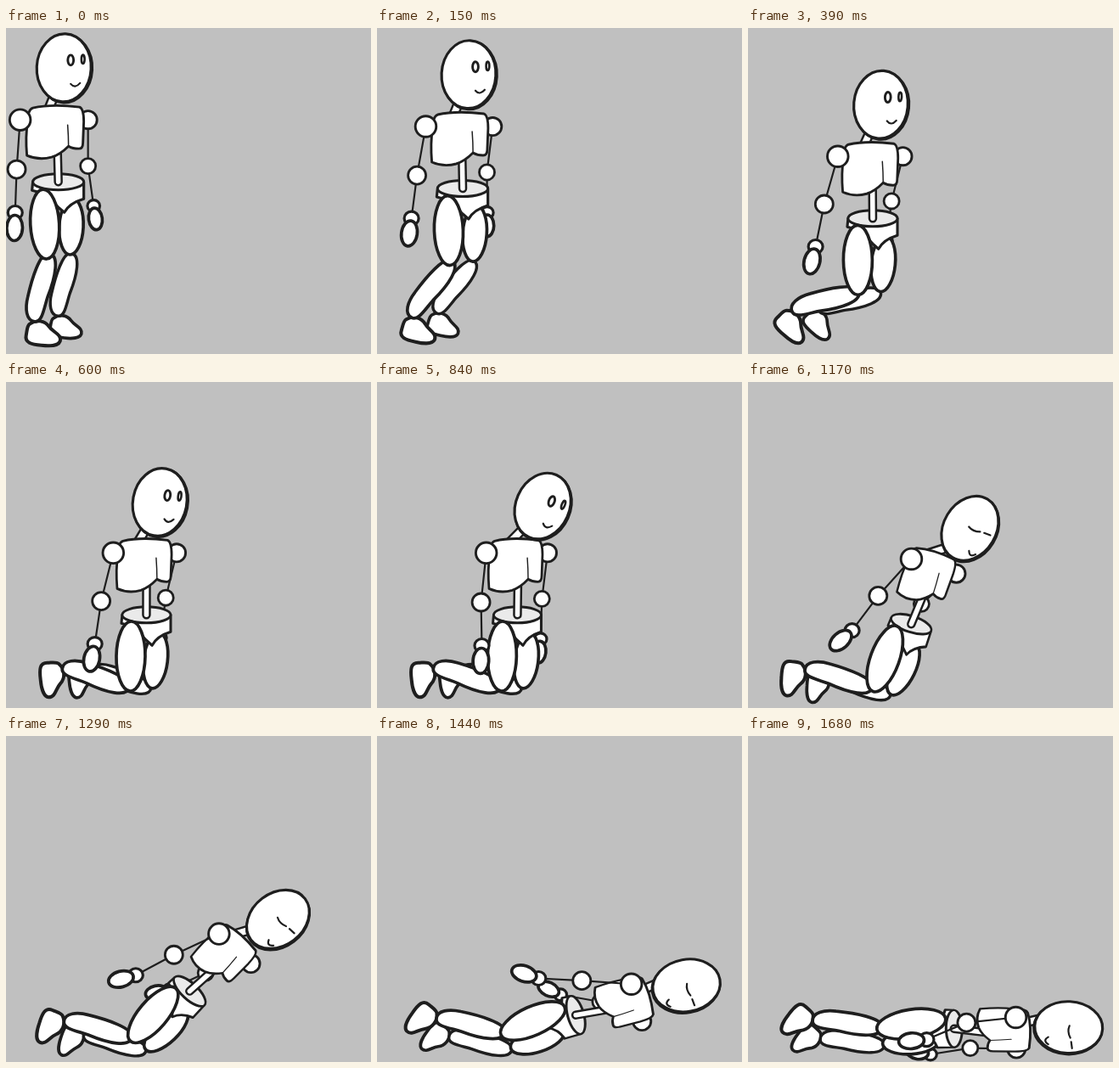
Write an HTML page with a canvas that moves like this. It is 430 by 384 pixels and loops after 1800 ms.

```html
<!DOCTYPE html>
<html lang="en">
<head>
<meta charset="utf-8">
<title>Falling puppet</title>
<style>
html, body { margin: 0; width: 430px; height: 384px; overflow: hidden; background: #c0c0c0; }
canvas { display: block; }
</style>
</head>
<body>
<canvas id="stage" width="430" height="384"></canvas>
<script>
const ctx = document.getElementById('stage').getContext('2d');
const INK = '#1e1e1e', LOOP = 1800, STEP = 30, END = 1680;

// Joint angles in degrees; the near knee is the root, twist turns the chest away.
const STAND = { x: 48, y: 265, thigh: -3, shin: 10, foot: 0, lean: 0, neck: 0, head: 0, twist: 0,
  arm: 4, fore: 2, farArm: 0, farFore: -8 };
const KNEEL = { x: 146, y: 357, thigh: 1, shin: 104, foot: 78, lean: 0, neck: 17, head: 21, twist: .25,
  arm: 6, fore: -1, farArm: 7, farFore: 2 };
const TIP = { x: 147, y: 357, thigh: 20, shin: 103, foot: 88, lean: 18, neck: 16, head: 28, twist: .65,
  arm: 42, fore: 37, farArm: 49, farFore: 37 };
const FALL = { x: 151, y: 346, thigh: 66, shin: 99, foot: 120, lean: 74, neck: -7, head: 77, twist: .85,
  arm: 94, fore: 93, farArm: 115, farFore: 100 };
const REST = { x: 158, y: 340, thigh: 81, shin: 93, foot: 122, lean: 89, neck: -9, head: 90, twist: 1,
  arm: 84, fore: 67, farArm: 91, farFore: 81 };
const ARM_KEYS = ['arm', 'fore', 'farArm', 'farFore'];

const rad = a => a * Math.PI / 180;
const ramp = (t, a, b) => Math.min(1, Math.max(0, (t - a) / (b - a)));

function blend(a, b, p, own = {}) {
  const out = {};
  for (const k in a) out[k] = a[k] + (b[k] - a[k]) * (own[k] ?? p);
  return out;
}

function sink(t) {
  const u = ramp(t, 0, 600), s = ramp(t, 0, 840), late = s ** 3;
  const p = blend(STAND, KNEEL, s, {
    x: 1 - (1 - u) ** 1.7, y: u ** 1.8, foot: u ** 1.8, shin: u, thigh: u, neck: late, head: late
  });
  for (const k of ARM_KEYS) p[k] += 11 * Math.sin(Math.PI * s);
  return p;
}

function pose(t) {
  if (t < 1035) return sink(t);
  if (t < 1170) return blend(KNEEL, TIP, ramp(t, 1035, 1170) ** 1.5);
  if (t < 1440) return blend(TIP, FALL, ramp(t, 1170, 1440));
  const slow = ramp(t, 1440, END);
  return blend(FALL, REST, ramp(t, 1440, 1545), Object.fromEntries(ARM_KEYS.map(k => [k, slow])));
}

// Point reached from p by the offset (dx, dy) turned by a
function from([x, y], a, dx, dy) {
  const c = Math.cos(rad(a)), s = Math.sin(rad(a));
  return [x + dx * c - dy * s, y + dx * s + dy * c];
}

function oval(rx, ry, x = 0, y = 0, a = 0) {
  const p = new Path2D();
  p.ellipse(x, y, rx, ry, rad(a), 0, 7);
  return p;
}

const SKULL = oval(32, 40, 0, 0, 3);
const SHIN = new Path2D('M2-41C16-42 15-14 10 10C8 24 9 41 0 41C-10 42-14 28-13 14C-12-8-8-40 2-41Z');
const FOOT = new Path2D('M-16-11C-8-17 2-15 7-8C12-1 22 1 20 9C18 15 6 15-2 14C-14 13-22 11-20 2C-19-3-19-9-16-11Z');
const CHEST = new Path2D('M-27-28Q-5-33 28-29Q33-27 33-12L32 13Q32 20 27 20Q20 20 15 17Q5 27-5 30Q-20 34-34 28Q-36 5-33-12Q-33-26-27-28Z');
const CREASE = new Path2D('M14-8Q15 5 15 17');
const BRIEFS = new Path2D('M-30 0L-31 10L-16 14L0 30L7 36Q13 25 30 20L30 0Z');
const SHUT = new Path2D('M-2-1Q5 2 13-2M18-3L26-4M12 24Q16 31 21 24');
const SMILE = new Path2D('M8 19Q13 25 19 18');

function ink(path, width, fill) {
  if (fill) {
    ctx.fillStyle = fill;
    ctx.fill(path);
  }
  ctx.strokeStyle = INK;
  ctx.lineWidth = width;
  ctx.stroke(path);
}

function place([x, y], a, paint, sx = 1, sy = 1) {
  ctx.save();
  ctx.translate(x, y);
  ctx.rotate(rad(a));
  ctx.scale(sx, sy);
  paint();
  ctx.restore();
}

const part = (at, a, path, width = 3.7, size = 1) =>
  place(at, a, () => ink(path, width, '#fff'), size, size);

function line(a, b, width, color = INK) {
  ctx.strokeStyle = color;
  ctx.lineWidth = width;
  ctx.beginPath();
  ctx.moveTo(...a);
  ctx.lineTo(...b);
  ctx.stroke();
}

function tube(a, b, width) {
  line(a, b, width);
  line(a, b, width - 5, '#fff');
}

function arm(shoulder, upper, fore, wristBend, size, reach) {
  const elbow = from(shoulder, upper, 0, 58.5 * reach);
  const wrist = from(elbow, fore, 0, 51 * reach);
  line(shoulder, elbow, 2.2);
  line(elbow, wrist, 2.2);
  part(elbow, 0, oval(10.5 * size, 10.5 * size), 2.8);
  part(wrist, 0, oval(8.5 * size, 8 * size), 3.2);
  part(wrist, fore + wristBend, oval(9.3 * size, 15 * size, 0, 18 * size));
  part(shoulder, 0, oval(12.3 * size, 12.3 * size), 2.9);
}

function lowerLeg(knee, shin, foot, size) {
  const ankle = from(knee, shin, 0, 82 * size);
  part(from(ankle, foot, 10 * size, 14 * size), foot, FOOT, 4, size);
  part(from(knee, shin, 0, 41 * size), shin, SHIN, 3.7, size);
}

function face(shut) {
  if (shut) {
    ink(SHUT, 2.2);
    return;
  }
  ink(oval(3.4, 6, 8, -9), 2.9);
  ink(oval(1.9, 5.2, 22.5, -10), 2.6);
  ink(SMILE, 2.2);
}

function draw(t) {
  ctx.fillStyle = '#c0c0c0';
  ctx.fillRect(0, 0, 430, 384);
  ctx.lineCap = ctx.lineJoin = 'round';

  const p = pose(t), q = p.twist, wide = 1 - .27 * q;
  const knee = [p.x, p.y];
  const hip = from(knee, p.thigh, 18, -83);
  const chest = from(hip, p.lean, 6 * q - 3, -59);
  const head = from(chest, p.lean + p.neck, 10, -75);
  const farThigh = p.thigh + 6;

  arm(from(chest, p.lean, 38 - 16 * q * q, -14), p.farArm, p.farFore, 18 * q, .86, .93);
  lowerLeg(from(hip, farThigh, 17 * wide, 83), p.shin, p.foot, .92);
  part(from(hip, farThigh, 18 * wide, 52), farThigh, oval(14.2, 33));
  lowerLeg(knee, p.shin, p.foot, 1);

  place(hip, p.lean, () => {
    ink(BRIEFS, 3.2, '#fff');
    ink(oval(30, 9.5), 3, '#eaeaea');
  }, wide);
  part(from(hip, p.thigh, -18.5 * wide, 49), p.thigh, oval(17, 41));

  tube(hip, from(chest, p.lean, 2, 22), 10.5);
  tube(from(chest, p.lean, -9, -25), from(head, p.head, -11, 30), 12.5);
  place(chest, p.lean, () => {
    ink(CHEST, 2.9, '#fff');
    ink(CREASE, 1.5);
  }, 1 - .24 * q);

  place(head, p.head, () => {
    // A shifted dark copy thickens the lower right edge.
    ctx.translate(.8, .6);
    ink(SKULL, 3.4, INK);
    ctx.translate(-1.2, -.9);
    ink(SKULL, 3.2, '#fff');
    face(t >= 1080);
  }, 1 - .05 * q);

  arm(from(chest, p.lean, 27 * q - 42, -14), p.arm, p.fore, 18 * q, 1, 1);
}

const start = performance.now();
function tick() {
  const now = (performance.now() - start) % LOOP;
  draw(Math.min(END, Math.floor(now / STEP) * STEP));
  requestAnimationFrame(tick);
}
tick();
</script>
</body>
</html>
```
